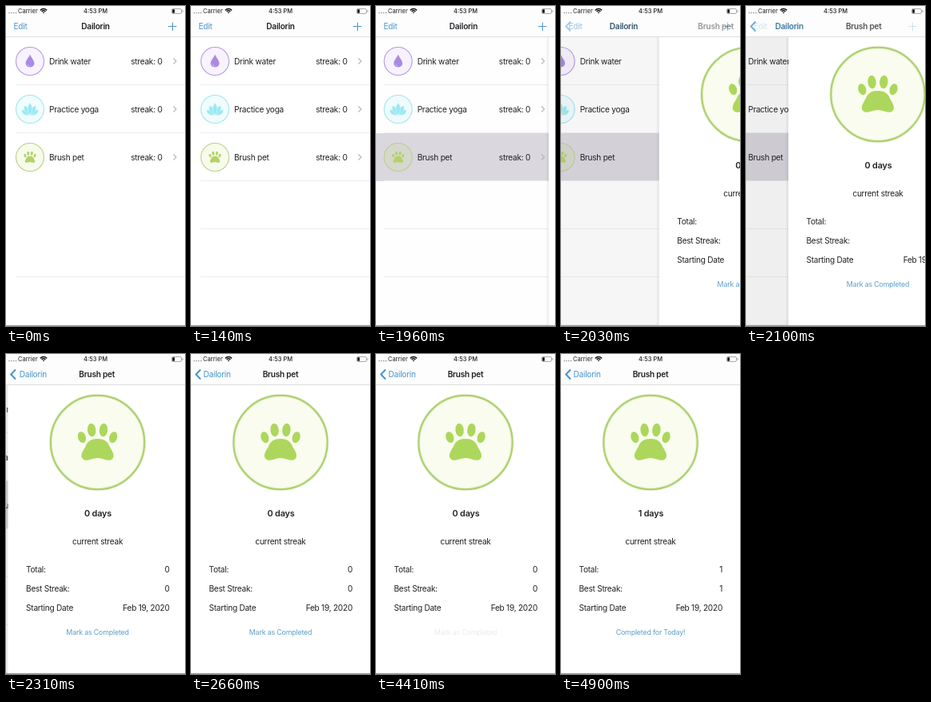
An HTML page with a canvas that plays this animation: 224 px wide and 400 px high, repeating every 6860 ms.

```html
<!DOCTYPE html>
<html lang="en">
<head>
<meta charset="utf-8">
<title>Habit list</title>
<style>
html, body { margin: 0; width: 100%; height: 100%; overflow: hidden; background: #fff; }
canvas { display: block; width: 224px; height: 400px; }
</style>
</head>
<body>
<canvas id="stage" width="224" height="400"></canvas>
<script>
const W = 224, H = 400, BAR = 39, LOOP = 6860, STEP = 70;
const PUSH = 1960, PUSH_END = 2520, PRESS = 4410, COUNT = 4550, DONE = 4690;
const APP = 'Dailorin';
const BLUE = '#4694ca', INK = '#202022', LINE = '#eeeef0', GREEN = '#acd75c';
const ctx = document.getElementById('stage').getContext('2d');

function withState(draw, { x = 0, y = 0, scale = 1, alpha = 1 } = {}) {
  ctx.save();
  ctx.translate(x, y);
  ctx.scale(scale, scale);
  ctx.globalAlpha *= alpha;
  draw();
  ctx.restore();
}

function setFont(size, weight, tracking) {
  ctx.font = `${weight} ${size}px Inter, Roboto, sans-serif`;
  ctx.letterSpacing = `${size * tracking}px`;
}

function text(str, x, midY, { size = 10.1, weight = 400, color = INK, align = 'left', tracking = -0.025 } = {}) {
  setFont(size, weight, tracking);
  ctx.textAlign = align;
  ctx.fillStyle = color;
  ctx.fillText(str, x, midY + size * 0.36);
}

function rect(x, y, w, h, color) {
  ctx.fillStyle = color;
  ctx.fillRect(x, y, w, h);
}

function polyline(points, color, width) {
  ctx.beginPath();
  points.forEach(([x, y]) => ctx.lineTo(x, y));
  ctx.strokeStyle = color;
  ctx.lineWidth = width;
  ctx.stroke();
}

function ellipse(x, y, rx, ry, angle = 0) {
  ctx.beginPath();
  ctx.ellipse(x, y, rx, ry, angle, 0, Math.PI * 2);
  ctx.fill();
}

function ring(x, y, r, color, width, tint) {
  ctx.beginPath();
  ctx.arc(x, y, r, 0, Math.PI * 2);
  ctx.fillStyle = tint;
  ctx.fill();
  ctx.strokeStyle = color;
  ctx.lineWidth = width;
  ctx.stroke();
}

// Icons are drawn around their own centre.
function paw(color) {
  ctx.fillStyle = color;
  for (const side of [-1, 1]) {
    ellipse(side * 7.4, -15.5, 5.2, 8.2, side * 0.1);
    ellipse(side * 19.6, -6.3, 4.9, 7.2, side * 0.3);
  }
  ctx.beginPath();
  ctx.moveTo(0, -4.5);
  ctx.bezierCurveTo(10, -4.5, 13, 0, 15.5, 6);
  ctx.bezierCurveTo(18, 10, 22, 16, 19, 20);
  ctx.bezierCurveTo(15, 25.5, 8, 19.5, 0, 19.5);
  ctx.bezierCurveTo(-8, 19.5, -15, 25.5, -19, 20);
  ctx.bezierCurveTo(-22, 16, -18, 10, -15.5, 6);
  ctx.bezierCurveTo(-13, 0, -10, -4.5, 0, -4.5);
  ctx.fill();
}

function drop() {
  ctx.fillStyle = '#aa8ae3';
  ctx.beginPath();
  ctx.moveTo(0, -8.5);
  ctx.bezierCurveTo(1.5, -4.5, 5.4, -1, 5.4, 2.6);
  ctx.bezierCurveTo(5.4, 9.2, -5.4, 9.2, -5.4, 2.6);
  ctx.bezierCurveTo(-5.4, -1, -1.5, -4.5, 0, -8.5);
  ctx.fill();
  ctx.beginPath();
  ctx.arc(0, 2.6, 3.3, 1.8, 2.9);
  ctx.strokeStyle = '#dccbf8';
  ctx.lineWidth = 0.8;
  ctx.stroke();
}

function lotus() {
  for (const [angle, length] of [[-1.05, 12.5], [1.05, 12.5], [-0.55, 14], [0.55, 14], [0, 15.5]]) {
    ctx.save();
    ctx.translate(0, 7.5);
    ctx.rotate(angle);
    ctx.beginPath();
    ctx.moveTo(0, 0);
    ctx.quadraticCurveTo(-5.8, -length * 0.55, 0, -length);
    ctx.quadraticCurveTo(5.8, -length * 0.55, 0, 0);
    ctx.fillStyle = '#98e8f3';
    ctx.fill();
    ctx.strokeStyle = '#e4fafc';
    ctx.lineWidth = 0.6;
    ctx.stroke();
    ctx.restore();
  }
}

const habits = [
  { name: 'Drink water', color: '#b39bdf', tint: 'rgba(185,135,240,.1)', icon: drop },
  { name: 'Practice yoga', color: '#9fe6f0', tint: 'rgba(110,225,235,.1)', icon: lotus },
  { name: 'Brush pet', color: '#bccf8c', tint: 'rgba(190,220,90,.12)', icon: () => withState(() => paw('#b3d36a'), { scale: 0.31 }) },
];

function drawList(t) {
  if (t >= PUSH) rect(0, 159, W * 2, 60, '#dbd8df');
  for (let i = 1; i <= 6; i++) {
    const settled = [1, 2, 5].includes(i) ? 1 : Math.min(1, t / 140);
    withState(() => rect(12, 38 + i * 60, W * 2, 1, LINE), { alpha: settled });
  }
  habits.forEach(({ name, color, tint, icon }, i) => {
    const y = 69 + i * 60;
    ring(30, y, 17.5, color, 1.1, tint);
    withState(icon, { x: 30, y });
    text(name, 54, y);
    text('streak: 0', 195.5, y, { align: 'right' });
    polyline([[209.5, y - 3.5], [213, y], [209.5, y + 3.5]], '#b4b4b9', 1.1);
  });
}

function drawButton(t) {
  const style = { size: 8.9, color: '#5a9fcd', align: 'center', tracking: -0.022 };
  if (t < PRESS) text('Mark as Completed', 112, 348, style);
  else if (t < COUNT) text('Mark as Completed', 112, 348, { ...style, color: t < PRESS + STEP ? '#ebebec' : '#f3f3f4' });
  else if (t >= DONE) {
    const alpha = Math.min(1, (t - DONE + STEP) / (4 * STEP));
    withState(() => text('Completed for Today!', 112, 348, style), { alpha });
  }
}

function drawDetail(t) {
  const count = t >= COUNT ? '1' : '0';
  rect(0, 0, W, H, '#fff');
  ring(112, 110.5, 58.7, 'rgba(172,205,110,.25)', 4, 'rgba(195,225,90,.1)');
  ring(112, 110.5, 58.7, '#abcf6c', 2, 'transparent');
  withState(() => paw(GREEN), { x: 112, y: 110.5 });
  text(`${count} days`, 112.5, 199, { size: 10.9, weight: 600, align: 'center', tracking: -0.02 });
  text('current streak', 112, 234, { align: 'center' });
  [['Total:', count], ['Best Streak:', count], ['Starting Date', 'Feb 19, 2020']].forEach(([label, value], i) => {
    const y = 269 + i * 24;
    text(label, 22.5, y);
    text(value, 202, y, { align: 'right' });
  });
  drawButton(t);
}

function drawStatus() {
  for (let i = 0; i < 4; i++) rect(3.5 + i * 2.8, 8, 1.2, 1.2, '#777');
  text('Carrier', 15, 6, { size: 7.6, tracking: 0 });
  text('4:53 PM', 112, 6, { size: 7.5, weight: 500, align: 'center', tracking: 0 });
  ctx.strokeStyle = '#111';
  ctx.lineWidth = 1.5;
  for (const r of [0.8, 3.2, 5.6]) {
    ctx.beginPath();
    ctx.arc(47, 9.2, r, -Math.PI * 0.76, -Math.PI * 0.24);
    ctx.stroke();
  }
  ctx.beginPath();
  ctx.roundRect(207.5, 3.5, 12, 6, 1.5);
  ctx.strokeStyle = '#999';
  ctx.lineWidth = 0.8;
  ctx.stroke();
  rect(208.3, 4.3, 2.7, 4.4, '#111');
  rect(220.5, 5.2, 1, 2.6, '#999');
}

function drawBar(rest) {
  const gone = 1 - rest;
  rect(0, 0, W, BAR, '#fdfdfd');
  rect(0, 38, W, 1, '#dededf');
  drawStatus();
  withState(() => {
    text('Edit', 9.5, 25.5, { color: BLUE });
    polyline([[203, 25.5], [213.5, 25.5]], BLUE, 1);
    polyline([[208.5, 20.5], [208.5, 31]], BLUE, 1);
  }, { alpha: rest });
  withState(() => {
    polyline([[12, 19.5], [6.2, 25.5], [12, 31.5]], BLUE, 2);
    text('Brush pet', 112 + 149 * rest, 25.5, { weight: 600, align: 'center' });
  }, { alpha: gone });

  // The app title slides into place as the back label.
  setFont(10.1, 600, -0.025);
  const titleLeft = 112 - ctx.measureText(APP).width / 2;
  const mix = (from, to) => Math.round(to + (from - to) * rest);
  text(APP, 15.5 + (titleLeft - 15.5) * rest ** 0.92, 25.5, {
    weight: rest > 0.1 ? 600 : 400,
    color: `rgb(${mix(32, 70)},${mix(32, 148)},${mix(34, 202)})`,
  });
}

// Share of the push still to travel: a critically damped spring.
function remaining(t) {
  if (t < PUSH) return 1;
  if (t >= PUSH_END) return 0;
  const u = 0.29 + 0.0177 * (t - PUSH);
  return (1 + u) * Math.exp(-u);
}

function draw(t) {
  const rest = remaining(t), edge = W * rest;
  rect(0, 0, W, H, '#fff');
  if (rest > 0) {
    withState(() => drawList(t), { x: -0.3 * (W - edge) });
    rect(0, 0, W, H, `rgba(0,0,0,${0.08 * (1 - rest)})`);
  }
  if (rest < 1) {
    const shade = ctx.createLinearGradient(edge - 4, 0, edge, 0);
    shade.addColorStop(0, 'rgba(0,0,0,0)');
    shade.addColorStop(1, `rgba(0,0,0,${0.08 * Math.min(1, rest * 4)})`);
    rect(edge - 4, 0, 4, H, shade);
    withState(() => drawDetail(t), { x: edge });
  }
  drawBar(rest);
  rect(0, H - 1, W, 1, '#999');
}

const start = performance.now();
function tick() {
  const t = (performance.now() - start) % LOOP;
  draw(Math.floor(t / STEP) * STEP);
  requestAnimationFrame(tick);
}
tick();
</script>
</body>
</html>
```
